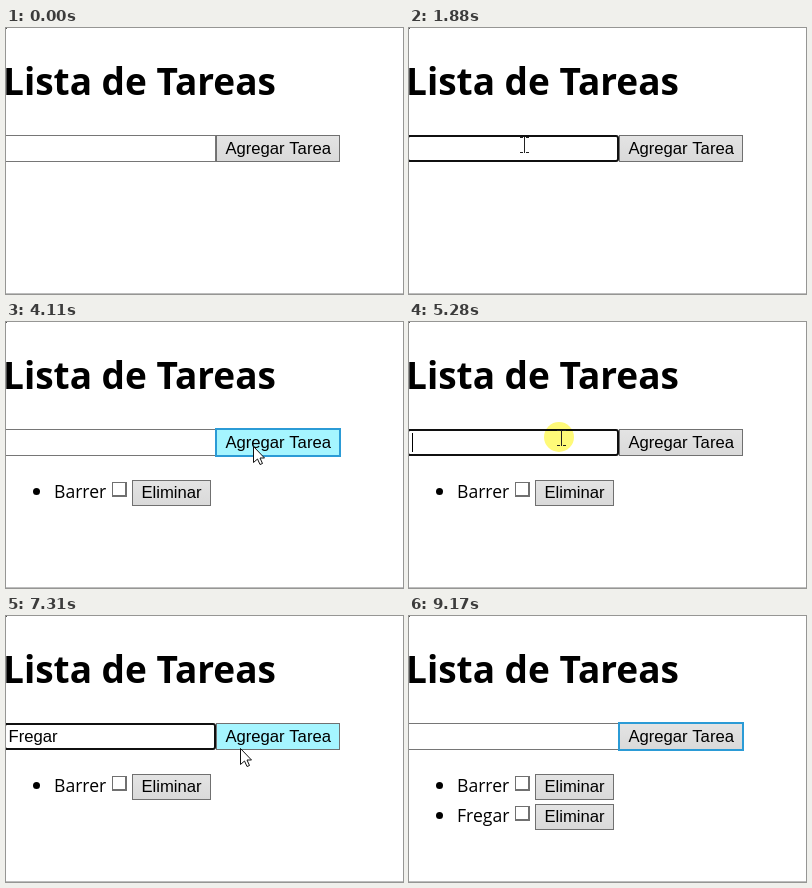
Recreate the animation shown at these times as an HTML page with a canvas. Size 397 px wide and 266 px high, loop 9.38 s.

```html
<!DOCTYPE html>
<html lang="es">
<head>
<meta charset="utf-8">
<title>Lista de Tareas</title>
<style>
html, body { margin: 0; width: 100%; height: 100%; overflow: hidden; background: #fff; }
canvas { display: block; }
</style>
</head>
<body>
<canvas id="stage" width="397" height="266"></canvas>
<script>
const ctx = document.getElementById('stage').getContext('2d');
const LOOP = 9380;
const HOLD = 230;
const BLINK = 530;
const HEAD = '700 37px "Open Sans", "Noto Sans", sans-serif';
const BODY = '17.6px "Open Sans", "Noto Sans", sans-serif';
const FORM = '16.667px "Liberation Sans", Arial, sans-serif';

const field = { x: 0, y: 107, w: 210, h: 27 };
const add = { x: 210, y: 107, w: 124, h: 27 };
const arrowShape = new Path2D('M0 0V16L4 12.5L6.5 18L9 17L6.5 11.5H11Z');

// One round: click the field, type a word, press the button
const rounds = [
  { text: 'Barrer', click: 1270, type: 2020, typed: 2780, press: 3880 },
  { text: 'Fregar', click: 5280, type: 5620, typed: 6280, press: 7460 }
];

// The pointer rests at each stop between its moves
const stops = [
  { x: 305, y: 266, from: 0, to: 230 },
  { x: 123, y: 130, from: 230, to: 870 },
  { x: 115, y: 117, from: 870, to: 1030 },
  { x: 247, y: 124, from: 3300, to: 3680 },
  { x: 152, y: 116, from: 4820, to: 5080 },
  { x: 234, y: 132, from: 6800, to: 7310 },
  { x: 398, y: 226, from: 8180, to: 8520 }
];

const inside = (p, b) => p.x >= b.x && p.x < b.x + b.w && p.y >= b.y && p.y < b.y + b.h;
const during = (t, start, length) => t >= start && t < start + length;

function rect(x, y, w, h, color) {
  ctx.fillStyle = color;
  ctx.fillRect(x, y, w, h);
}

function disc(x, y, r, color) {
  ctx.fillStyle = color;
  ctx.beginPath();
  ctx.arc(x, y, r, 0, 2 * Math.PI);
  ctx.fill();
}

function frame(x, y, w, h, color, line = 1) {
  ctx.strokeStyle = color;
  ctx.lineWidth = line;
  ctx.strokeRect(x + line / 2, y + line / 2, w - line, h - line);
}

function label(text, x, y, font) {
  ctx.font = font;
  ctx.fillStyle = '#000';
  ctx.fillText(text, x, y);
}

function pointer(t) {
  const i = stops.findLastIndex(s => s.from <= t);
  const b = stops[i];
  const a = stops[Math.max(0, i - 1)];
  let k = Math.min(1, (t - b.from) / (b.to - b.from));
  k = k * k * (3 - 2 * k);
  return { x: Math.round(a.x + (b.x - a.x) * k), y: Math.round(a.y + (b.y - a.y) * k) };
}

function drawPointer({ x, y }, overField) {
  ctx.save();
  ctx.translate(x, y);
  if (overField) {
    rect(0, -8, 1, 16, '#222');
    for (const end of [-8, 7]) {
      rect(-4, end, 3, 1, '#222');
      rect(2, end, 3, 1, '#222');
    }
  } else {
    ctx.translate(.5, .5);
    ctx.fillStyle = '#fff';
    ctx.strokeStyle = '#111';
    ctx.lineWidth = 1;
    ctx.fill(arrowShape);
    ctx.stroke(arrowShape);
  }
  ctx.restore();
}

function halo({ x, y }) {
  ctx.globalCompositeOperation = 'multiply';
  disc(x - 2, y - 1, 15, '#fffa78');
  ctx.globalCompositeOperation = 'source-over';
}

function button(text, { x, y, w, h }, hover) {
  const fill = ctx.createLinearGradient(0, y, 0, y + h);
  fill.addColorStop(0, '#e4e4e4');
  fill.addColorStop(1, '#d9d9d9');
  rect(x, y, w, h, hover ? '#a5f5ff' : fill);
  frame(x, y, w, h, '#707070');
  label(text, x + 9.4, y + h - 8, FORM);
}

function input(t, round, hover) {
  const { x, y, w, h } = field;
  const focused = round && t < round.press;
  if (focused) {
    ctx.strokeStyle = '#101010';
    ctx.lineWidth = 2;
    ctx.beginPath();
    ctx.roundRect(x - 1, y + 1, w, h - 2, 2);
    ctx.stroke();
  } else {
    frame(x - 2, y, w + 2, h, hover ? '#4f4f4f' : '#767676');
  }
  if (!round) return;

  const { text, click, type, typed } = round;
  const gap = (typed - type) / (text.length - 1);
  const count = Math.max(0, Math.min(text.length, Math.floor((t - type) / gap) + 1));
  const shown = text.slice(0, count);
  label(shown, 2.5, 126, FORM);
  const lastKey = count ? type + (count - 1) * gap : click;
  if (focused && (t - lastKey) % (2 * BLINK) < BLINK - 10) {
    rect(Math.round(3 + ctx.measureText(shown).width), y + 4, 1, 19, '#000');
  }
}

function task(text, y) {
  disc(30.5, y + 11.5, 3.5, '#000');
  label(text, 48, y + 18, BODY);
  const x = 53 + Math.round(ctx.measureText(text).width + 1);
  rect(x, y + 2, 15, 15, '#707070');
  rect(x + 1, y + 3, 12, 12, '#fff');
  button('Eliminar', { x: x + 20, y, w: 79, h: 26 });
}

function draw(t) {
  const p = pointer(t);
  const overField = inside(p, field);
  const overAdd = inside(p, add);
  const round = rounds.find(r => t >= r.click && t < r.press + HOLD);
  const last = rounds.findLast(r => t >= r.click);

  rect(0, 0, 397, 266, '#fff');
  rect(0, 0, 1, 1, '#555');
  rect(0, 265, 397, 1, '#bdbdbd');
  label('Lista de Tareas', -3, 67, HEAD);
  input(t, round, overField);
  button('Agregar Tarea', add, overAdd);
  if (last && t >= last.press) {
    frame(add.x - 1, add.y - 1, add.w + 2, add.h + 2, '#2b9bd6', 2);
  }
  rounds.forEach((r, i) => {
    if (t >= r.press + HOLD) task(r.text, 158 + 30 * i);
  });

  if (rounds.some(r => during(t, r.click, HOLD) || during(t, r.press, HOLD))) halo(p);
  drawPointer(p, overField);
}

const began = performance.now();
function tick() {
  draw((performance.now() - began) % LOOP);
  requestAnimationFrame(tick);
}
tick();
</script>
</body>
</html>
```
